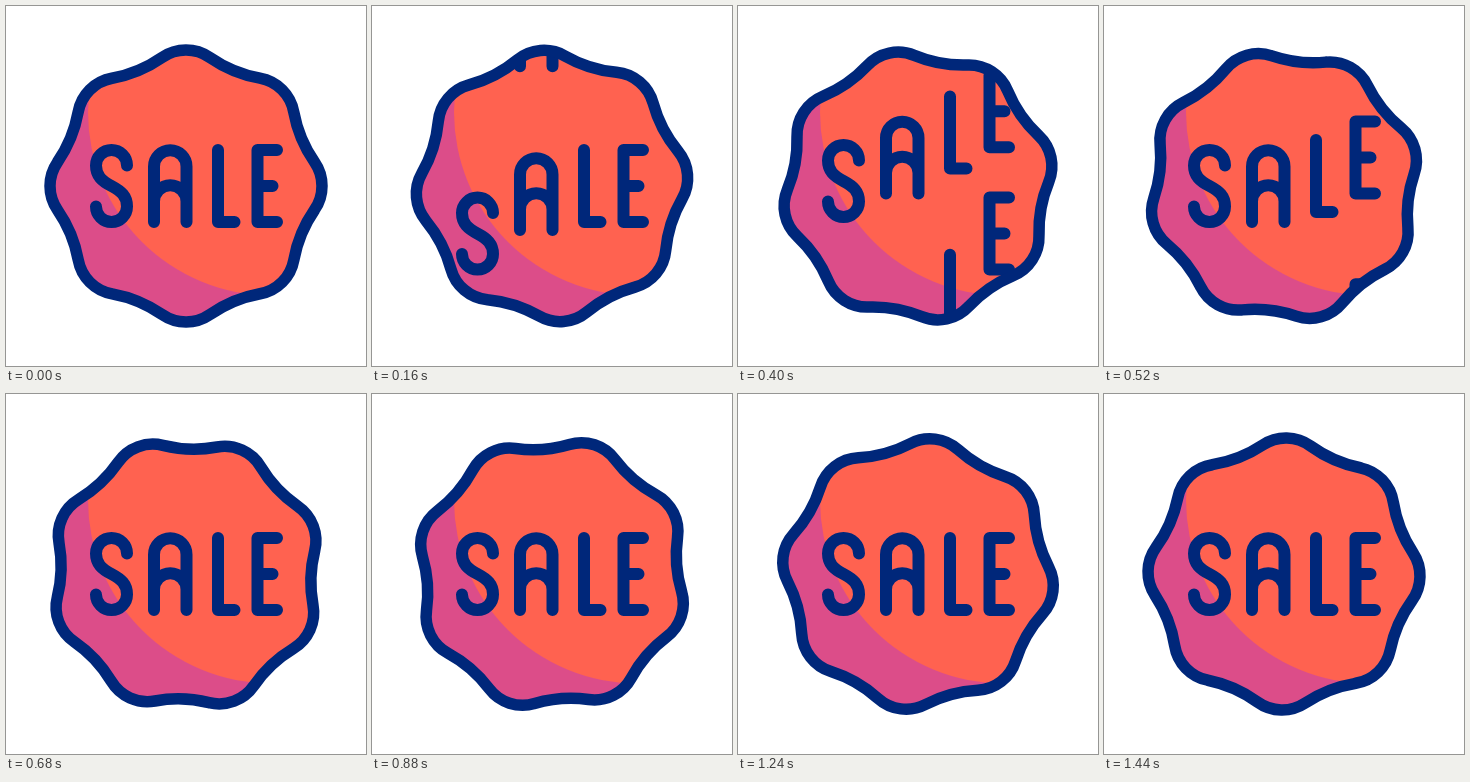
An HTML page with a canvas that plays this animation: 360 px wide and 360 px high, repeating every 1.48 s.

```html
<!DOCTYPE html>
<html lang="en">
<head>
<meta charset="utf-8">
<title>Sale badge</title>
<style>
  html, body { margin: 0; width: 100%; height: 100%; overflow: hidden; background: #fff; }
  canvas { display: block; }
</style>
</head>
<body>
<canvas id="stage" width="360" height="360"></canvas>
<script>
const ctx = document.getElementById('stage').getContext('2d');
const LOOP = 1480;
const NAVY = '#00277a', CORAL = '#ff6250', PINK = '#dc4d89';

const letters = [
  'M121 159.5A15.5 15.5 0 0 0 90 159.5C90 170 96 175 105.5 180S121 190 121 200.5A15.5 15.5 0 0 1 90 200.5',
  'M148 216V160.5A16.25 16.25 0 0 1 180.5 160.5V216M148 195.5A16.25 16.25 0 0 1 180.5 195.5',
  'M212 144V216H228.5',
  'M271 144H251.5V216H271M251.5 180H266.5'
].map(d => new Path2D(d));

// Eight convex lobes joined by tangent concave arcs.
function badgePath(turn) {
  const path = new Path2D(), step = Math.PI / 4;
  const lobe = { dist: 94, r: 42 }, dip = { dist: 253, r: 128 };
  const bend = Math.atan2(dip.dist * Math.sin(step / 2), dip.dist * Math.cos(step / 2) - lobe.dist);
  const arc = (part, angle, from, to, ccw) =>
    path.arc(180 + part.dist * Math.cos(angle), 180 + part.dist * Math.sin(angle), part.r, from, to, ccw);
  for (let i = 0; i < 8; i++) {
    const a = turn + i * step;
    arc(lobe, a, a - bend, a + bend, false);
    arc(dip, a + step / 2, a + bend + Math.PI, a + step - bend + Math.PI, true);
  }
  path.closePath();
  return path;
}

function ease(t, start, end) {
  const x = Math.min(1, Math.max(0, (t - start) / (end - start)));
  return x * x * (3 - 2 * x);
}

function drawLetter(path, dy) {
  ctx.save();
  ctx.translate(0, dy);
  ctx.stroke(path);
  ctx.restore();
}

function draw(t) {
  const badge = badgePath(-Math.PI / 4 * t / LOOP);
  ctx.fillStyle = '#fff';
  ctx.fillRect(0, 0, 360, 360);
  ctx.strokeStyle = NAVY;
  ctx.lineCap = ctx.lineJoin = 'round';

  ctx.save();
  ctx.clip(badge);
  ctx.fillStyle = PINK;
  ctx.fillRect(0, 0, 360, 360);
  ctx.fillStyle = CORAL;
  ctx.beginPath();
  ctx.arc(265.5, 106, 183.5, 0, 2 * Math.PI);
  ctx.fill();

  // Old letters leave one by one; new ones start together and land one by one.
  ctx.lineWidth = 12;
  letters.forEach((path, i) => {
    const delay = 80 * i;
    drawLetter(path, 208 * ease(t, 32 + delay, 448 + delay));
    drawLetter(path, 185 * (ease(t, 40, 440 + delay) - 1));
  });
  ctx.restore();

  ctx.lineWidth = 11.5;
  ctx.stroke(badge);
}

function tick() {
  draw(performance.now() % LOOP);
  requestAnimationFrame(tick);
}
tick();
</script>
</body>
</html>
```
